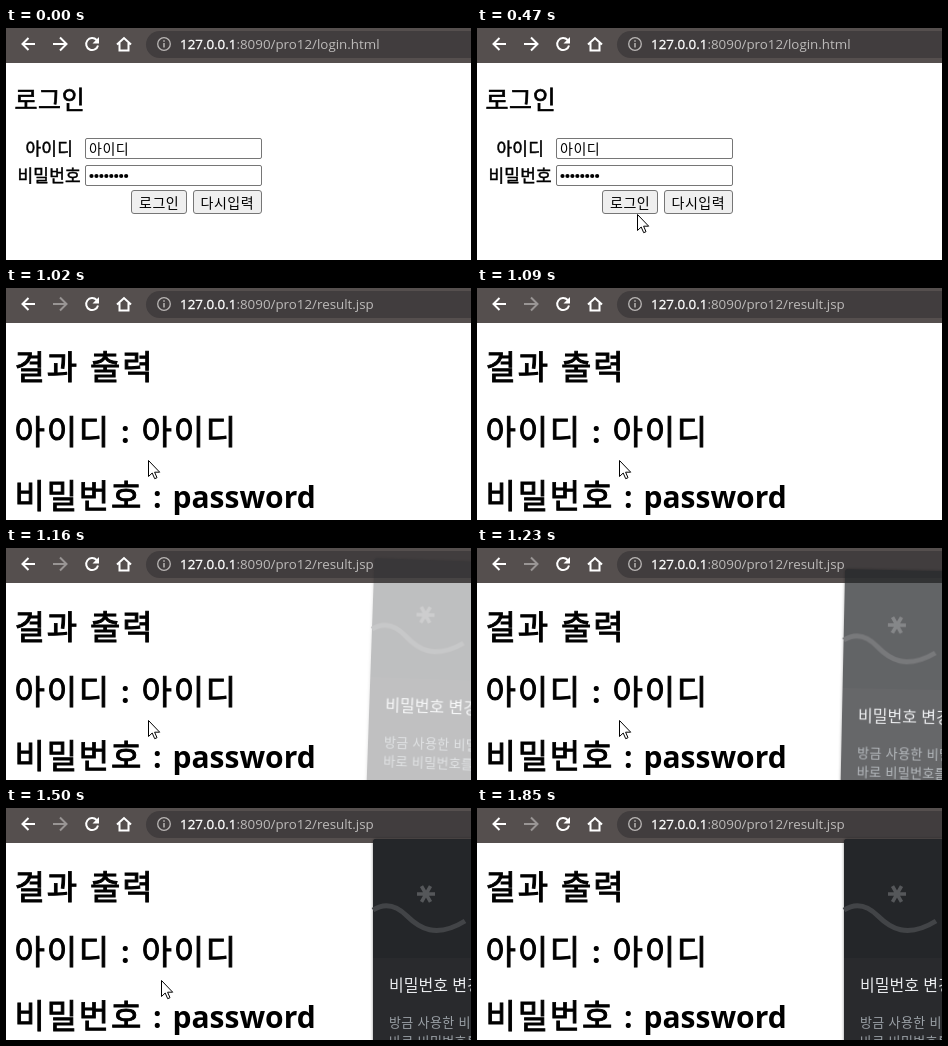
Animation, 465 px wide and 232 px high, one loop 2.31 s. Source, as an HTML page:

```html
<!DOCTYPE html>
<html lang="ko">
<head>
<meta charset="utf-8">
<title>로그인</title>
<style>
  html, body { margin: 0; width: 100%; height: 100%; overflow: hidden; background: #fff; }
  svg { display: block; width: 465px; height: 232px; }
  text { font-family: "Noto Sans CJK KR", "Noto Sans CJK", sans-serif; white-space: pre; }

  .login, .result, .hover, .popup, .cursor { animation: 2310ms step-end infinite; }
  .login { animation-name: login; }
  .result { animation-name: result; }
  .hover { animation-name: hover; }
  .popup { animation-name: popup; transform-origin: 367px 130px; }
  .cursor { animation-name: cursor; }

  .icon { fill: none; stroke: #fff; stroke-width: 2; }
  .result .icon { stroke: #999594; }
  .url { font: 13.35px "Open Sans", "Noto Sans", sans-serif; fill: #bdbbba; }
  .url tspan { fill: #fff; stroke: #fff; stroke-width: .3px; }

  /* semi-bold: regular weight thickened by a thin outline */
  .h1, .h2, .th { stroke: #000; stroke-width: .028em; }
  .h1 { font-size: 33px; letter-spacing: 1.8px; }
  .h1 .latin { font: 700 30px "Open Sans", "Noto Sans", sans-serif; letter-spacing: 0; stroke: none; }
  .h2 { font-size: 25px; letter-spacing: .6px; }
  .th { font-size: 17px; letter-spacing: .2px; }
  .control { font-size: 14px; letter-spacing: .5px; }
  .box { fill: #fff; stroke: #767676; }
  .button { fill: #efefef; stroke: #767676; }
  .button.hover { fill: #e5e5e5; stroke: #4f4f4f; }
  .note { font-size: 13px; letter-spacing: .35px; fill: #9aa0a6; }

  @keyframes login {
    0% { visibility: visible; }
    41.12%, 100% { visibility: hidden; }
  }
  @keyframes result {
    0% { visibility: hidden; }
    41.12%, 100% { visibility: visible; }
  }
  @keyframes hover {
    0% { opacity: 0; }
    23.37% { opacity: 1; }
    41.12%, 100% { opacity: 0; }
  }
  @keyframes popup {
    0% { opacity: 0; transform: none; }
    50.21% { opacity: .3; transform: translate(-2px, -21px) rotate(2deg); }
    53.24% { opacity: .72; transform: translate(-1px, -10px) rotate(1.2deg); }
    56.27% { opacity: .94; transform: translate(0, -3px) rotate(.4deg); }
    59.3%, 100% { opacity: 1; transform: none; }
  }
  @keyframes cursor {
    0% { opacity: 0; transform: translate(259px, 224px); }
    11.25% { opacity: 1; transform: translate(259px, 224px); }
    14.28% { opacity: 1; transform: translate(221px, 211px); }
    17.31% { opacity: 1; transform: translate(185px, 197px); }
    20.34% { opacity: 1; transform: translate(160px, 186px); }
    23.37% { opacity: 1; transform: translate(151px, 179px); }
    26.4% { opacity: 1; transform: translate(146px, 175px); }
    29.43% { opacity: 1; transform: translate(143px, 173px); }
    32.46% { opacity: 1; transform: translate(142px, 172px); }
    64.93% { opacity: 1; transform: translate(155px, 172px); }
    67.96% { opacity: 1; transform: translate(188px, 179px); }
    70.99% { opacity: 1; transform: translate(228px, 191px); }
    74.02% { opacity: 1; transform: translate(272px, 207px); }
    77.05% { opacity: 1; transform: translate(315px, 223px); }
    80.08%, 100% { opacity: 0; transform: translate(315px, 223px); }
  }
</style>
</head>
<body>
<svg viewBox="0 0 465 232">
  <defs>
    <path id="forward" d="M47 16H60M54 9.5 60.5 16 54 22.5"/>
  </defs>
  <rect width="465" height="232" fill="#fff"/>

  <!-- toolbar -->
  <rect width="465" height="35" fill="#554f4e"/>
  <rect x="140" y="3" width="400" height="27" rx="13.5" fill="#413d3e"/>
  <g class="icon">
    <path d="M29 16H16.5M22.5 10 16.5 16 22.5 22"/>
    <path d="M90.6 12A6 6 0 1 0 92 17.5"/>
    <path d="M111 16.5 118 10 125 16.5M113.5 15V22.5H122.5V15"/>
  </g>
  <path d="M93 9V15.5H86.5Z" fill="#fff"/>
  <circle cx="158" cy="16" r="6.3" fill="none" stroke="#b9b6b5" stroke-width="1.3"/>
  <path d="M158 15V19.5M158 12.2V13.7" stroke="#b9b6b5" stroke-width="1.5"/>

  <g class="login">
    <use class="icon" href="#forward"/>
    <text class="url" x="174" y="21"><tspan>127.0.0.1</tspan>:8090/pro12/login.html</text>
    <text class="h2" x="8.5" y="81">로그인</text>
    <text class="th" x="19.5" y="127">아이디</text>
    <text class="th" x="11.5" y="153.5">비밀번호</text>
    <rect class="box" x="79.5" y="110.5" width="176" height="20" rx="1.5"/>
    <rect class="box" x="79.5" y="137.5" width="176" height="20" rx="1.5"/>
    <text class="control" x="83" y="126">아이디</text>
    <path d="M85.5 148h35" fill="none" stroke="#000" stroke-width="4.2" stroke-linecap="round" stroke-dasharray="0 4.95"/>
    <rect class="button" x="125.5" y="162.5" width="55" height="23" rx="2.5"/>
    <rect class="button hover" x="125.5" y="162.5" width="55" height="23" rx="2.5"/>
    <rect class="button" x="187.5" y="162.5" width="68" height="23" rx="2.5"/>
    <text class="control" x="133" y="179.5">로그인</text>
    <text class="control" x="194.5" y="179.5">다시입력</text>
  </g>

  <g class="result">
    <use class="icon" href="#forward"/>
    <text class="url" x="174" y="21"><tspan>127.0.0.1</tspan>:8090/pro12/result.jsp</text>
    <g class="h1">
      <text x="8.5" y="91">결과</text>
      <text x="84" y="91">출력</text>
      <text x="8.5" y="156">아이디</text>
      <text class="latin" x="115" y="155">:</text>
      <text x="135.5" y="156">아이디</text>
      <text x="8.5" y="220">비밀번호</text>
      <text class="latin" x="147" y="220">:</text>
      <text class="latin" x="166.5" y="220">password</text>
    </g>
  </g>

  <g class="popup">
    <rect x="367" y="31" width="220" height="260" rx="3" fill="#292a2d" style="filter: drop-shadow(0 0 1.5px rgba(0,0,0,.45))"/>
    <path d="M367 150V34a3 3 0 0 1 3-3H587V150Z" fill="#242629"/>
    <path d="M367 102C378 95 389 96 401 108S430 131 459 113" fill="none" stroke="#424447" stroke-width="5"/>
    <path d="M411 86H429M415.5 78.2 424.5 93.8M424.5 78.2 415.5 93.8" stroke="#55575a" stroke-width="3.6"/>
    <text x="383" y="182.5" font-size="16" fill="#e8eaed">비밀번호 변경</text>
    <text class="note" x="383" y="218.5">방금 사용한 비밀번호가</text>
    <text class="note" x="383" y="238">바로 비밀번호를</text>
  </g>

  <path class="cursor" d="M.5 .5V16.5L4.2 13 6.7 18.7 9 17.7 6.6 12.2H11.7Z" fill="#fff" stroke="#000"/>
</svg>
</body>
</html>
```
